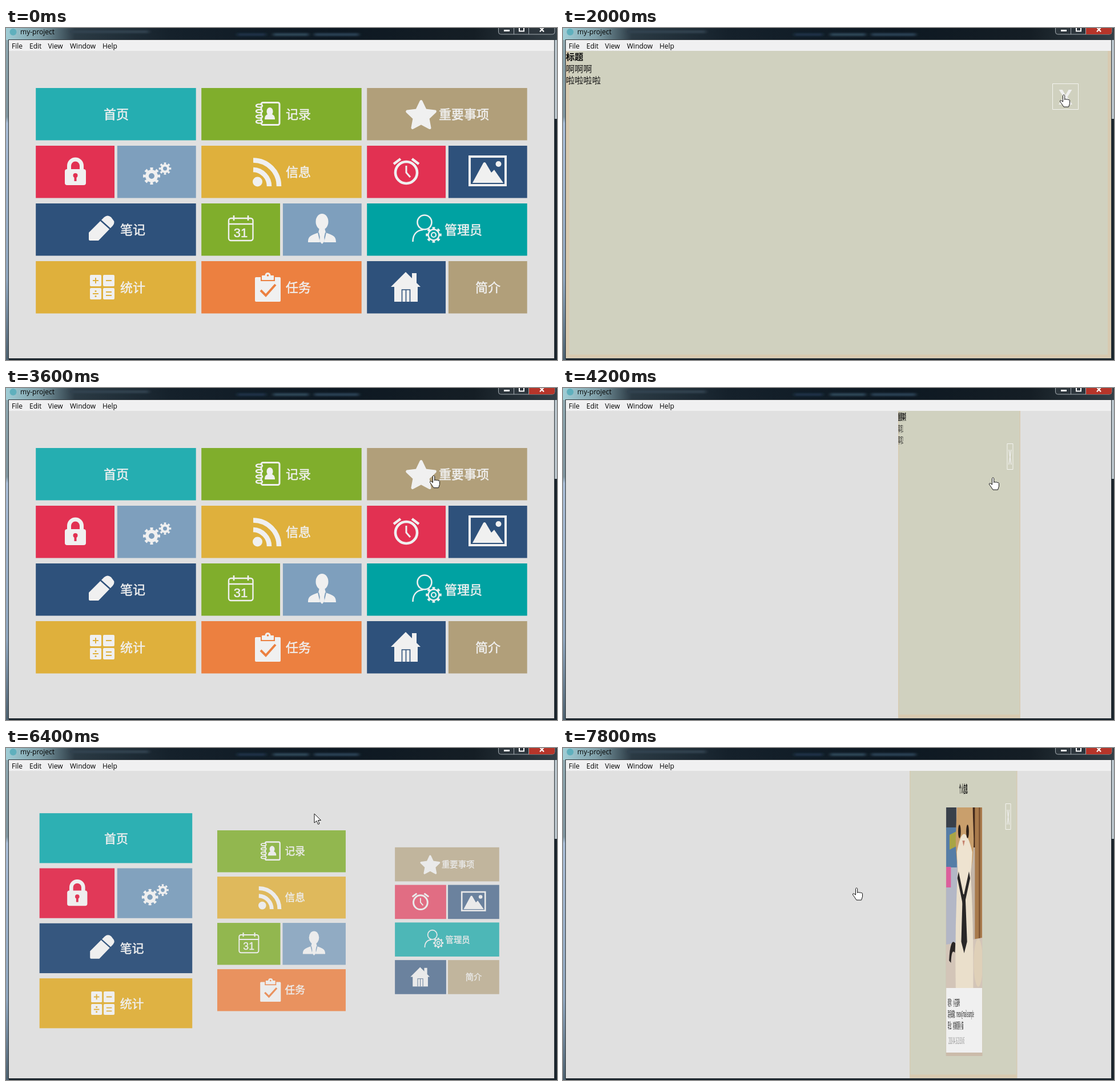
An HTML page that plays this animation: 965 px wide and 581 px high, repeating every 8000 ms.

```html
<!DOCTYPE html>
<html lang="zh-CN">
<head>
<meta charset="utf-8">
<title>my-project</title>
<style>
html, body { margin: 0; width: 100%; height: 100%; overflow: hidden; background: #e0e0e0; }
svg { display: block; }
text { font-family: "Noto Sans CJK SC", "Noto Sans CJK", sans-serif; }
.ui { font: 12px "Open Sans", sans-serif; }
.tile text { font-size: 22px; fill: #f0f0f0; stroke: #f0f0f0; stroke-width: .5; }
.tile .day { font: 22px "Liberation Sans", Arial, sans-serif; }
.page text { font-size: 15.3px; fill: #151515; }
.page .bold { font-weight: bold; fill: #080808; }
.page .close { font: bold 36px "Open Sans", sans-serif; fill: #f0f0f0; }
</style>
</head>
<body>
<svg id="stage" width="965" height="581" viewBox="0 0 965 581"></svg>
<script>
const LOOP = 8000, STEP = 200, WHITE = '#f0f0f0';
const C = {
  teal: '#25aeb1', green: '#80ae2c', sand: '#b19f7a', red: '#e23152', steel: '#7e9fbd',
  gold: '#dfb03c', navy: '#2e517b', orange: '#ec8040', sea: '#00a2a2'
};

const rect = (x, y, w, h, fill, more = '') =>
  `<rect x="${x}" y="${y}" width="${w}" height="${h}" fill="${fill}" ${more}/>`;
const fill = (d, color = WHITE) => `<path d="${d}" fill="${color}"/>`;
const line = (d, w, color = WHITE) => `<path d="${d}" fill="none" stroke="${color}" stroke-width="${w}"/>`;
const dot = (x, y, r, color = WHITE) => `<circle cx="${x}" cy="${y}" r="${r}" fill="${color}"/>`;
const oval = (x, y, rx, ry, color = WHITE) => `<ellipse cx="${x}" cy="${y}" rx="${rx}" ry="${ry}" fill="${color}"/>`;
const ring = (x, y, r, w, more = '') =>
  `<circle cx="${x}" cy="${y}" r="${r}" fill="none" stroke="${WHITE}" stroke-width="${w}" ${more}/>`;
const text = (x, y, s, cls = '', more = '') => `<text x="${x}" y="${y}" class="${cls}" ${more}>${s}</text>`;
const gear = (x, y, r, w, tooth) => ring(x, y, r, w) +
  ring(x, y, r + w / 2 + tooth / 2 - .5, tooth, 'pathLength="16" stroke-dasharray="1" stroke-dashoffset=".5"');

function star(cx, cy, R, r) {
  const pts = [...Array(10)].map((_, i) => {
    const a = i * Math.PI / 5 - Math.PI / 2, d = i % 2 ? r : R;
    return (cx + d * Math.cos(a)).toFixed(1) + ',' + (cy + d * Math.sin(a)).toFixed(1);
  });
  return `<polygon points="${pts.join(' ')}" fill="${WHITE}" stroke="${WHITE}" stroke-width="5" stroke-linejoin="round"/>`;
}

const icons = {
  book: rect(447, 130.5, 32, 39, 'none', `rx="3" stroke="${WHITE}" stroke-width="3"`) +
    [136, 145.5, 155, 164].map(y => `<ellipse cx="443.5" cy="${y}" rx="5.5" ry="2.6" fill="${C.green}" stroke="${WHITE}" stroke-width="2.4"/>`).join('') +
    oval(462, 146, 5.6, 7) + fill('M453 160c0-8 4-9 9-10c5 1 9 2 9 10z'),
  star: star(727, 154, 25.5, 12.5),
  lock: rect(103, 247, 37, 28, WHITE, 'rx="4"') + line('M110.5 249v-8a11 11 0 0 1 22 0v8', 7) +
    dot(121.5, 258, 4, C.red) + rect(119.5, 259, 4, 9, C.red),
  gears: gear(255, 259, 8, 6, 4.5) + gear(278.5, 246, 5.6, 4.2, 3.6),
  feed: dot(440.5, 269, 8.5) + line('M433 248a29 29 0 0 1 28 29', 8.5) + line('M433 231.5a45 45 0 0 1 45 45.5', 8.5),
  alarm: ring(701, 253, 19, 4.6) + line('M701 241v12l7 8', 3) + line('M679 238l12-9M723 238l-12-9', 4.5),
  photo: rect(812, 225, 63, 50, 'none', `stroke="${WHITE}" stroke-width="4"`) +
    fill('M817 271L836 236Q838 234 840 236L850 253L855 248L871 271z') + dot(862.5, 238, 5),
  pencil: fill('M145 370V358L172 331Q178 326 184 331L187 335Q192 340 187 346L162 372H147Q145 372 145 370z') +
    line('M164 335L184 353', 2.4, C.navy),
  calendar: rect(390, 333, 42.5, 39, 'none', `rx="4" stroke="${WHITE}" stroke-width="2.4"`) +
    line('M390 343h43M399 328v9M424 328v9', 2.6) + text(411, 366, '31', 'day', 'text-anchor="middle"'),
  person: oval(553.5, 339, 11, 14) + fill('M529 375c0-11 5-12 18-17l2-8h9l2 8c13 5 18 6 18 17z') +
    line('M547 358L551 375M560 358L556 375', 2, C.steel) + fill('M551 360h5l1 4 1 9-4.500 5-4.500-5 1-9z'),
  admin: ring(733, 340, 12.5, 2.6) + line('M712.5 374c0-13 7-20 18-21', 2.6) +
    dot(749, 362, 13, C.sea) + gear(749, 362, 9.5, 2.4, 3.6) + ring(749, 362, 4, 2.2),
  calc: [[147, 432], [170, 432], [147, 455], [170, 455]].map(p => rect(...p, 20, 20, WHITE, 'rx="2"')).join('') +
    line('M152 442h10M157 437v10M175 442h10M152 465h10M175 462h10M175 468h10', 2, C.gold) +
    dot(157, 460.5, 1.6, C.gold) + dot(157, 469.5, 1.6, C.gold),
  clip: rect(436, 436, 45, 43, WHITE, 'rx="2"') + rect(446, 432, 25, 11, C.orange) +
    rect(448, 433, 21, 8, WHITE, 'rx="1"') + dot(458.5, 433, 5) + dot(458.5, 433, 1.8, C.orange) + line('M446 459l9 9 17-19', 4, C.orange),
  house: fill('M674 453L700 427L726 453z') + rect(711, 429, 8, 17, WHITE) + rect(680, 451, 41, 28, WHITE) +
    line('M693.5 479v-21h14v21M700.5 458v21', 1.6, C.navy)
};

// column, row, part (0 whole, 1 left half, 2 right half), colour, icon, label, label x
const tiles = [
  [0, 0, 0, 'teal', '', '首页', 171], [0, 1, 1, 'red', 'lock'], [0, 1, 2, 'steel', 'gears'],
  [0, 2, 0, 'navy', 'pencil', '笔记', 200], [0, 3, 0, 'gold', 'calc', '统计', 200],
  [1, 0, 0, 'green', 'book', '记录', 490], [1, 1, 0, 'gold', 'feed', '信息', 490],
  [1, 2, 1, 'green', 'calendar'], [1, 2, 2, 'steel', 'person'], [1, 3, 0, 'orange', 'clip', '任务', 490],
  [2, 0, 0, 'sand', 'star', '重要事项', 758], [2, 1, 1, 'red', 'alarm'], [2, 1, 2, 'navy', 'photo'],
  [2, 2, 0, 'sea', 'admin', '管理员', 768], [2, 3, 1, 'navy', 'house'], [2, 3, 2, 'sand', '', '简介', 822]
];

function tile([col, row, part, color, icon, label, x]) {
  const y = 105 + row * 101;
  return rect(52.2 + col * 290 + (part === 2 ? 142.7 : 0), y, part ? 137.8 : 280.5, 91.5, C[color]) +
    (icon ? icons[icon] : '') + (label ? text(x, y + 54, label) : '');
}
const column = i => `<g class="tile" id="col${i}">${tiles.filter(t => t[0] === i).map(tile).join('')}</g>`;

// Cat portrait on a 320 x 316 card picture
const cat = `<svg x="329" y="104" width="320" height="316">` +
  rect(0, 0, 320, 316, '#c3b5a8') + rect(0, 0, 100, 240, '#b3b7c6') + rect(0, 0, 90, 40, '#39404a') +
  rect(0, 35, 95, 70, '#557da6') + fill('M30 48l60-6v26l-60 6z', '#a9a545') + rect(0, 104, 42, 36, '#dc5f9c') +
  rect(235, 0, 25, 70, '#42291c') + rect(255, 0, 65, 232, '#a87a4c') + rect(290, 0, 12, 232, '#7d5331') +
  fill('M0 240L320 228V316H0z', '#d3c5b8') + oval(285, 272, 40, 42, '#dfd0b8') +
  line('M80 246Q42 236 34 270', 17, '#2a2625') +
  fill('M105 100Q75 210 85 316H240Q245 190 212 100z', '#eadfcb') +
  fill('M85 55L95 0H235L245 55Q245 120 160 125Q88 120 85 55z', '#c99f6c') +
  fill('M95 78Q155 15 232 78Q225 135 160 138Q100 132 95 78z', '#eee3d0') +
  oval(118, 42, 12, 12, '#2d2018') + oval(190, 42, 12, 12, '#2d2018') + fill('M144 58h22l-11 10z', '#c68470') +
  line('M105 118L155 166L208 118', 16, '#292727') + fill('M146 152h24l16 83-26 20-26-20z', '#292727') + `</svg>`;

const notes = (title, ...rows) => text(5, 56, title, 'bold') + rows.map((s, i) => text(5, 77 + 20 * i, s)).join('');
const profile = text(482, 79, '个人信息', 'bold', 'text-anchor="middle" style="font-size:19px"') +
  rect(327, 105, 324, 434, '#cbbbaa') + rect(329, 104, 320, 429, WHITE) + cat +
  ['昵称：小花猫咪', '联系邮箱：meow@mail.example', '职业：前端观察小猫'].map((s, i) => text(344, 451 + 20 * i, s)).join('') +
  text(350, 518, '2018-04-16 20:30:45', '', 'style="fill:#888"');

const page = (body, i) => `<g class="page" id="page${i}">` + rect(5, 40, 955, 538, '#d0d1bf') +
  line('M8 40V574.5H957V40', 6, '#d8cab0') + body +
  rect(857.5, 97.5, 45, 45, 'none', 'stroke="#f4f4f0" vector-effect="non-scaling-stroke"') +
  text(880, 134, 'X', 'close', 'text-anchor="middle"') + '</g>';

const blur = (x, y, w, color) => rect(x, y, w, 5, color, 'filter="url(#soft)"');
const chrome =
  rect(0, 0, 965, 581, '#1a252d') + rect(0, 0, 965, 21, 'url(#bar)') + rect(0, 21, 5, 560, 'url(#side)') +
  rect(960, 21, 5, 138, '#b9c4cb') +
  blur(112, 4, 138, '#33434f') + blur(405, 9, 50, '#1d3346') + blur(468, 9, 62, '#2f4759') + blur(540, 9, 78, '#294354') +
  dot(12.5, 7, 6, '#5fb0bd') + text(25, 11, 'my-project', 'ui') +
  rect(4.5, 20.5, 956, 558, '#e0e0e0', 'stroke="#2b3338"') + rect(5, 21, 955, 19, '#f0f0f1') +
  [['File', 10], ['Edit', 41], ['View', 73.5], ['Window', 112], ['Help', 169]].map(([s, x]) => text(x, 35.5, s, 'ui')).join('') +
  rect(862.5, -6, 98.5, 17, '#2c353c', 'rx="4" stroke="#a3abb0"') +
  `<path id="hot" d="M916 0H961V7Q961 11 957 11H916z" fill="#b5352a"/>` +
  line('M889.5 0V11M915.5 0V11', 1, '#a3abb0') + rect(872, 3, 10, 3, '#fff') +
  line('M899 -1V5.5H907V-1', 2, '#fff') + line('M935 6.5L942 -1M942 6.5L935 -1', 2.2, '#fff');

const stage = document.getElementById('stage');
stage.innerHTML = `<defs>
  <linearGradient id="bar"><stop offset="0" stop-color="#a0cdd6"/><stop offset=".06" stop-color="#7f9fa8"/>
    <stop offset=".125" stop-color="#2b3a44"/><stop offset=".3" stop-color="#15212b"/><stop offset=".6" stop-color="#0d1822"/>
    <stop offset=".85" stop-color="#151e25"/><stop offset="1" stop-color="#343f46"/></linearGradient>
  <linearGradient id="side" x2="0" y2="1"><stop offset="0" stop-color="#8da6ae"/><stop offset=".24" stop-color="#7f949e"/>
    <stop offset=".26" stop-color="#a9bdd6"/><stop offset=".75" stop-color="#8ea5bd"/><stop offset="1" stop-color="#4b5f6e"/></linearGradient>
  <filter id="soft" x="-20%" y="-100%" width="140%" height="300%"><feGaussianBlur stdDeviation="3 1.5"/></filter>
  <clipPath id="view"><rect x="5" y="40" width="955" height="538"/></clipPath></defs>` +
  chrome + `<g clip-path="url(#view)">${[0, 1, 2].map(column).join('')}` +
  [notes('标题', '啊啊啊', '啦啦啦啦'), notes('重要事项', '事项1', '事项2'), profile].map(page).join('') + '</g>' +
  `<g id="cursor" stroke="#111" stroke-linejoin="round">
    <path id="arrow" d="M0 0V16L4 12.5L6.5 18.5L9 17.5L6.5 11.5H11.5z" fill="#fff"/>
    <path id="hand" d="M-1.5 1.5c0-2 3.2-2 3.2 0v7c0-1.5 3-1.5 3.2 0c.2-1.3 2.8-1.2 3 .6c.3-1.2 2.6-1 2.6 1v5l-2 6h-8.5l-4-6c-2-2.5-3.2-4-2.2-5s2.5 0 4.7 2z" fill="#fff"/></g>`;

const el = id => document.getElementById(id);
const cols = [0, 1, 2].map(i => el('col' + i)), pages = [0, 1, 2].map(i => el('page' + i));

// open: page turns in; close: page slides off left; back: tiles return
const visits = [
  { open: 700, close: 2200, back: 2285 },
  { open: 3870, close: 5490, back: 5615 },
  { open: 7484, close: Infinity, back: Infinity }
];
// delay and duration of each column's return
const returns = [[0, 1000], [230, 1000], [568, 530]];
// time, x, y, hand
const moves = [
  [200, 640, 520, 0], [600, 510, 170, 1], [1000, 510, 165, 0], [1800, 877, 117, 1], [2200, 877, 117, 1],
  [2400, 850, 118, 0], [3000, 674, 125, 0], [3400, 745, 150, 1], [3800, 753, 157, 1], [4200, 753, 157, 1],
  [4600, 760, 150, 0], [5200, 880, 115, 1], [5600, 885, 113, 0], [6400, 540, 115, 0],
  [6800, 525, 190, 1], [7200, 514, 245, 1], [LOOP, 514, 245, 1]
];

const clamp = v => Math.max(0, Math.min(1, v));
const smooth = u => u * u * (3 - 2 * u);
const inOut = u => u < .5 ? 4 * u ** 3 : 1 - 4 * (1 - u) ** 3;

function tileScale(t, i) {
  const v = visits.filter(p => t >= p.open).pop();
  if (!v) return 1;
  if (t >= v.back) {
    const [delay, span] = returns[i];
    return 1 - (1 - clamp((t - v.back - delay) / span)) ** 2;
  }
  const u = (t - v.open) / 300;
  return u >= 1 ? 0 : 1 - .4 * (1 - (1 - clamp(u / .7)) ** 2);
}

function drawPage(node, { open, close }, t) {
  const sx = Math.sin(inOut(clamp((t - open) / 1000)) * Math.PI / 2);
  const slide = smooth(clamp((t - close) / 700));
  const shown = sx > .001 && slide < 1;
  node.style.display = shown ? '' : 'none';
  if (shown) node.setAttribute('transform', `translate(${755 * (1 - sx) - 957 * slide} 0) scale(${sx} 1)`);
}

function drawCursor(t) {
  const i = moves.findIndex(m => m[0] > t);
  el('cursor').style.display = i > 0 ? '' : 'none';
  if (i < 1) return;
  const a = moves[i - 1], b = moves[i], u = (t - a[0]) / (b[0] - a[0]);
  el('cursor').setAttribute('transform', `translate(${a[1] + (b[1] - a[1]) * u} ${a[2] + (b[2] - a[2]) * u})`);
  el('hand').style.display = a[3] ? '' : 'none';
  el('arrow').style.display = a[3] ? 'none' : '';
}

function draw(t) {
  cols.forEach((g, i) => {
    const s = tileScale(t, i), x = 192.5 + 290 * i, y = 302.3;
    g.setAttribute('transform', `translate(${x} ${y}) scale(${s}) translate(${-x} ${-y})`);
    g.setAttribute('opacity', s);
  });
  pages.forEach((g, i) => drawPage(g, visits[i], t));
  el('hot').style.display = t >= 400 ? '' : 'none';
  drawCursor(t);
}

// The screen runs at five pictures per second
const start = performance.now();
function tick() {
  const t = (performance.now() - start) % LOOP;
  draw(Math.floor(t / STEP) * STEP);
  requestAnimationFrame(tick);
}
tick();
</script>
</body>
</html>
```
